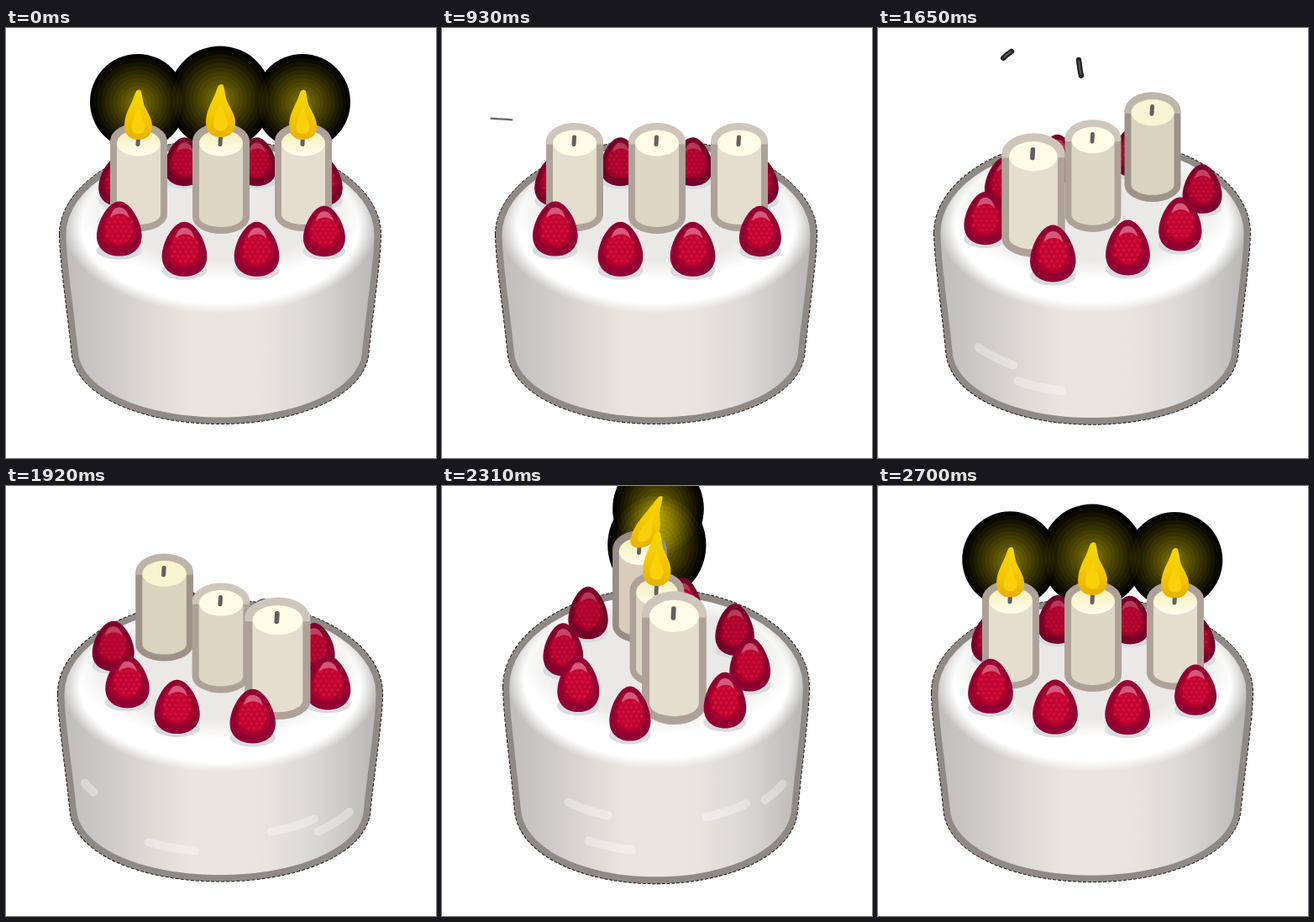
Animation of 512 by 512 pixels, one loop 2730 ms. Source, as an HTML page with a canvas:

```html
<!DOCTYPE html>
<html lang="en">
<head>
<meta charset="utf-8">
<title>Birthday cake</title>
<style>
  html, body { margin: 0; width: 100%; height: 100%; overflow: hidden; background: #fff; }
  canvas { display: block; width: 512px; height: 512px; }
</style>
</head>
<body>
<canvas id="stage" width="512" height="512"></canvas>
<script>
const ctx = document.getElementById('stage').getContext('2d');
const LOOP = 2730, TAU = Math.PI * 2, RAD = Math.PI / 180;
const SPIN_START = 1337, SPIN_TIME = 1405;
const TILT = .49; // depth of the cake top seen from above

const clamp = (v, a = 0, b = 1) => Math.min(b, Math.max(a, v));
const mix = (a, b, k) => a + (b - a) * k;
const blend = (a, b, k) => `rgb(${a.map((v, i) => Math.round(mix(v, b[i], k)))})`;

// side: orbit direction, off/on: when the flame dies and returns
const candles = [
  { side: -1, off: 800, on: 1960, lift: 0, size: 1 },
  { side: 0, off: 690, on: 2140, lift: 3, size: 1.06 },
  { side: 1, off: 570, on: 2400, lift: 0, size: 1 }
];

// angle from the front, distance from the middle, size
const berries = [
  [-63.4, 135, 1.03], [-21.4, 118, 1], [21.4, 118, 1], [63.4, 138, .96],
  [116.6, 135, 1], [158.6, 118, 1], [-158.6, 118, 1], [-116.6, 135, 1]
];

// angle and height of the light marks on the side
const gleams = [[-77, 324], [-56, 341], [-169, 316], [-126, 343],
  [-256, 306], [-246, 341], [-196, 308]];

const squash = [[1350, 1], [1470, 1.052], [1740, .962], [1980, 1.019],
  [2310, .953], [2560, 1]];

const plumes = [
  [[157, 130], [130, 124], [119, 92], [130, 57], [149, 36], [159, 28], [166, 24]],
  [[258, 130], [272, 116], [262, 92], [248, 75], [242, 57], [239, 38], [237, 22]]
];

function widthAt(t) {
  if (t <= squash[0][0]) return 1;
  for (let i = 1; i < squash.length; i++) {
    const [a, va] = squash[i - 1], [b, vb] = squash[i];
    if (t < b) return mix(va, vb, .5 - .5 * Math.cos(Math.PI * (t - a) / (b - a)));
  }
  return 1;
}

function oval(x, y, rx, ry, fill, from = 0, to = TAU) {
  ctx.beginPath();
  ctx.ellipse(x, y, rx, ry, 0, from, to);
  ctx.fillStyle = fill;
  ctx.fill();
}

function softOval(x, y, rx, ry, rgb, edge) {
  const g = ctx.createRadialGradient(0, 0, 0, 0, 0, 1);
  g.addColorStop(0, `rgba(${rgb},1)`);
  g.addColorStop(edge, `rgba(${rgb},1)`);
  g.addColorStop(1, `rgba(${rgb},0)`);
  ctx.save();
  ctx.translate(x, y);
  ctx.scale(rx, ry);
  oval(0, 0, 1, 1, g);
  ctx.restore();
}

function line(points, width, color) {
  ctx.beginPath();
  points.forEach(p => ctx.lineTo(p[0], p[1]));
  ctx.lineWidth = width;
  ctx.strokeStyle = color;
  ctx.lineCap = ctx.lineJoin = 'round';
  ctx.stroke();
}

function cakePath(inset) {
  const i = inset;
  ctx.beginPath();
  ctx.ellipse(255, 246, 191.5 - i, 113 - i, 0, Math.PI, TAU);
  ctx.bezierCurveTo(446.5 - i, 275, 436 - i, 345, 432 - i, 387);
  ctx.bezierCurveTo(427 - i, 441 - i, 342, 471.5 - i, 255, 471.5 - i);
  ctx.bezierCurveTo(168, 471.5 - i, 83 + i, 441 - i, 78 + i, 387);
  ctx.bezierCurveTo(74 + i, 345, 63.5 + i, 275, 63.5 + i, 246);
  ctx.closePath();
}

function drawCake(spin, t) {
  cakePath(0);
  ctx.fillStyle = '#8f8a85';
  ctx.fill();
  ctx.lineWidth = 1;
  ctx.lineCap = 'butt';
  ctx.setLineDash([4, 2]);
  ctx.strokeStyle = '#1a1816';
  ctx.stroke();
  ctx.setLineDash([]);

  ctx.save();
  cakePath(8);
  ctx.clip();
  const side = ctx.createLinearGradient(72, 0, 438, 0);
  [['#bfbebc', 0], ['#cfcdca', .16], ['#dedad4', .28], ['#eae5de', .4],
    ['#e9e5de', .62], ['#dddbd8', .78], ['#cac9c7', .9], ['#b9b8b6', 1]]
    .forEach(([c, k]) => side.addColorStop(k, c));
  ctx.fillStyle = side;
  ctx.fillRect(60, 120, 390, 360);
  softOval(255, 236, 187, 104, '255,255,255', .88);
  softOval(256, 218, 172, 82, '235,233,232', .72);
  if (t > 1560 && t < 2560) drawGleams(spin * .8);
  ctx.restore();
}

function drawGleams(turn) {
  for (const [start, y] of gleams) {
    const mid = start + turn;
    if (Math.abs(mid) > 70) continue;
    const half = 9.5 * clamp((70 - Math.abs(mid)) / 18);
    const pts = [];
    for (let k = -1; k <= 1; k += .25) {
      const a = (mid + k * half) * RAD;
      pts.push([256 + 175 * Math.sin(a), y + 93 * Math.cos(a)]);
    }
    line(pts, 10, 'rgba(255,255,255,.33)');
  }
}

function dropPath(w, h) {
  ctx.beginPath();
  ctx.moveTo(0, -h);
  ctx.bezierCurveTo(w * .5, -h, w, -h * .62, w, -h * .37);
  ctx.bezierCurveTo(w, -h * .13, w * .56, 0, 0, 0);
  ctx.bezierCurveTo(-w * .56, 0, -w, -h * .13, -w, -h * .37);
  ctx.bezierCurveTo(-w, -h * .62, -w * .5, -h, 0, -h);
}

function drawBerry(b) {
  ctx.save();
  ctx.translate(b.x, b.y);
  ctx.scale(b.size, b.size);
  oval(0, -7, 27, 11, '#d9dbe1');
  dropPath(26.8, 65);
  ctx.fillStyle = blend([116, 0, 40], [146, 0, 50], b.near);
  ctx.fill();
  ctx.translate(0, -10);
  dropPath(20, 48);
  ctx.fillStyle = blend([150, 0, 38], [172, 0, 44], b.near);
  ctx.fill();
  ctx.clip();
  oval(0, -24, 16, 21, blend([172, 2, 44], [192, 4, 50], b.near));
  for (let r = 0; r < 6; r++)
    for (let c = -2; c <= 2; c++)
      if (Math.abs(c) + Math.abs(r - 2.5) < 4.2)
        oval(c * 6.6 + (r % 2 ? 3.3 : 0) - 1.6, -36 + r * 5.5, 1.9, 1.9,
          blend([186, 10, 54], [212, 16, 60], b.near));
  ctx.beginPath();
  ctx.moveTo(-11, -36);
  ctx.quadraticCurveTo(-6, -50, 1, -49);
  ctx.quadraticCurveTo(9, -47, 12, -35);
  ctx.quadraticCurveTo(3, -45, -11, -36);
  ctx.fillStyle = blend([182, 56, 86], [214, 88, 122], b.near);
  ctx.fill();
  ctx.restore();
}

function tubePath(rx, top, bottom, ry) {
  ctx.beginPath();
  ctx.moveTo(-rx, top);
  ctx.lineTo(-rx, bottom);
  ctx.ellipse(0, bottom, rx, ry, 0, Math.PI, 0, true);
  ctx.lineTo(rx, top);
  ctx.closePath();
}

function placeCandle(c) {
  ctx.translate(c.x, c.y);
  ctx.scale(c.scale, c.scale);
  ctx.translate(0, -107 - c.lift);
}

function drawCandle(c) {
  const edge = blend([150, 140, 130], [174, 162, 152], c.near);
  const rim = c.flame ? edge : blend([184, 174, 163], [207, 198, 187], c.near);
  const body = c.side ? blend([216, 205, 186], [229, 222, 207], c.near) : '#ddd6c5';
  ctx.save();
  placeCandle(c);
  tubePath(34, 0, 87 + c.lift, 20);
  ctx.fillStyle = edge;
  ctx.fill();
  oval(0, 0, 34, 22, rim, Math.PI * .95, Math.PI * 2.05);
  tubePath(26, 2, 87 + c.lift, 12);
  ctx.fillStyle = body;
  ctx.fill();
  let face = blend([247, 241, 200], [254, 251, 230], c.near);
  if (c.flame) {
    face = ctx.createLinearGradient(0, -14, 0, 18);
    face.addColorStop(0, '#f6eeb4');
    face.addColorStop(1, '#fffdf0');
  }
  oval(0, 2, 26, 15.5, face);
  line([[-.5, -5], [-1, 3.5]], 5, '#62605f');
  if (c.flame) drawFlame(c);
  ctx.restore();
}

function flamePath(w, h) {
  ctx.beginPath();
  ctx.moveTo(w * .06, -h);
  ctx.bezierCurveTo(w * .34, -h, w * .22, -h * .78, w * .55, -h * .62);
  ctx.bezierCurveTo(w * .85, -h * .46, w, -h * .38, w, -h * .28);
  ctx.bezierCurveTo(w, -h * .09, w * .6, 0, 0, 0);
  ctx.bezierCurveTo(-w * .6, 0, -w, -h * .09, -w, -h * .28);
  ctx.bezierCurveTo(-w, -h * .54, -w * .4, -h * .74, -w * .24, -h * .92);
  ctx.quadraticCurveTo(-w * .14, -h, w * .06, -h);
}

function drawFlame(c) {
  const k = c.size * c.flame;
  ctx.save();
  ctx.translate(-.5, -2 - c.lift);
  ctx.transform(1, 0, -c.lean / 60, 1, 0, 0);
  ctx.scale(k, k);
  const g = ctx.createLinearGradient(0, -59, 0, 0);
  g.addColorStop(0, '#f7d600');
  g.addColorStop(.5, '#f2ca00');
  g.addColorStop(1, '#e9af00');
  flamePath(16.5, 59.5);
  ctx.fillStyle = g;
  ctx.fill();
  ctx.translate(0, -7);
  flamePath(8, 30);
  ctx.fillStyle = '#f8d00c';
  ctx.fill();
  ctx.restore();
}

function drawGlow(c, bright) {
  ctx.save();
  placeCandle(c);
  ctx.translate(c.lean * .9 - 1, -47 - c.lift * 1.7);
  const r = (c.side ? 57 : 61.5) * c.flame;
  if (!bright) oval(0, 0, r, r, '#000');
  else {
    // stacked rings add up where glows meet
    ctx.globalCompositeOperation = 'lighter';
    for (let i = 1; i <= 11; i++) {
      const q = r * (1 - i * .08);
      oval(0, 2 * i / 11, q, q, 'rgb(11,10,0)');
    }
  }
  ctx.restore();
}

function drawPlume(pts, t) {
  const head = clamp((t - 900) / 900), tail = mix(.1, .667, clamp((t - 1350) / 300, 0, 1.6));
  const start = t < 1350 ? Math.min(.1, head) : tail;
  const width = 8 * clamp((1860 - t) / 260);
  if (head <= start || t > 1790) return;
  const n = pts.length - 1, curve = [];
  for (let i = 0; i <= 24; i++) {
    const u = mix(start, head, i / 24) * n, j = Math.min(n - 1, Math.floor(u)), f = u - j;
    const a = pts[Math.max(0, j - 1)], b = pts[j], c = pts[j + 1], d = pts[Math.min(n, j + 2)];
    curve.push([0, 1].map(m => b[m] + .5 * f * (c[m] - a[m] + f * (2 * a[m] - 5 * b[m] +
      4 * c[m] - d[m] + f * (3 * (b[m] - c[m]) + d[m] - a[m])))));
  }
  ctx.save();
  ctx.resetTransform();
  line(curve, width, '#242424');
  line(curve.slice(2, -2), width * .28, '#5a5a5a');
  ctx.restore();
}

function drawPuff(c, t) {
  const u = (t - c.off + 5) / 165;
  if (u <= 0 || u >= 1) return;
  const head = 100 * (1 - (1 - u) ** 3), tail = 100 * u ** 1.5, pts = [];
  for (let i = 0; i <= 10; i++) {
    const d = mix(tail, head, i / 10);
    pts.push([c.x - d, 126 - .2 * d + 2 * Math.sin(d / 14)]);
  }
  line(pts, 3.4 * (1 - u * .4), '#6a6866');
}

function drawWind(t) {
  if (t < 570 || t > 960) return;
  for (const [y, x, len] of [[122, 316, 42], [182, 330, 50], [90, 420, 60]]) {
    const left = x - (t - 630) * 1.1;
    line([[left, y - 2], [left + len * .4, y], [left + len, y + 1]], 3.5, 'rgba(255,255,255,.35)');
  }
}

function pose(t) {
  const u = clamp((t - SPIN_START) / SPIN_TIME);
  const spin = 180 * (1 - Math.cos(Math.PI * u));
  const speed = 180 * Math.PI / SPIN_TIME * Math.sin(Math.PI * u);
  const a = spin * RAD;
  const beat = t > 1900 ? t - LOOP : t;
  const sway = 2 - 2 * Math.cos(TAU * beat / 360);

  for (const c of candles) {
    const depth = -c.side * Math.sin(a);
    c.x = 256 + c.side * 98 * Math.cos(a);
    c.z = 242 + depth * 98 * TILT;
    c.y = c.z + c.lift;
    c.scale = 1 + .19 * Math.max(0, depth);
    c.near = clamp(1 + Math.min(0, depth));
    const blown = clamp((t - c.off + 60) / 60);
    if (t < c.off) {
      c.flame = 1 - .35 * blown ** 2;
      c.lean = sway - 42 * blown;
    } else {
      c.flame = clamp((t - c.on) / 110);
      c.lean = sway - 80 * depth * speed * Math.abs(c.side);
    }
  }
  return spin;
}

function placeBerries(spin) {
  return berries.map(([start, r, size]) => {
    const p = (start + spin) * RAD;
    const y = 242 + r * TILT * Math.cos(p);
    return {
      x: 255.5 + r * Math.sin(p), y, z: y,
      size: size * (.945 + .06 * Math.cos(p)),
      near: clamp(.6 + .9 * Math.cos(p)),
      draw: drawBerry
    };
  });
}

function draw(t) {
  const spin = pose(t), wide = widthAt(t);
  ctx.resetTransform();
  ctx.fillStyle = '#fff';
  ctx.fillRect(0, 0, 512, 512);

  ctx.translate(255, 415);
  ctx.scale(wide, mix(1, 1 / wide, .77));
  ctx.translate(-255, -415);

  const lit = candles.filter(c => c.flame > 0);
  lit.forEach(c => drawGlow(c, false));
  lit.forEach(c => drawGlow(c, true));
  drawCake(spin, t);
  plumes.forEach(p => drawPlume(p, t));
  candles.forEach(c => drawPuff(c, t));

  candles.map(c => ({ z: c.z, draw: () => drawCandle(c) }))
    .concat(placeBerries(spin))
    .sort((p, q) => p.z - q.z)
    .forEach(item => item.draw(item));
  drawWind(t);
}

const began = performance.now();
function tick() {
  draw((performance.now() - began) % LOOP);
  requestAnimationFrame(tick);
}
tick();
</script>
</body>
</html>
```
